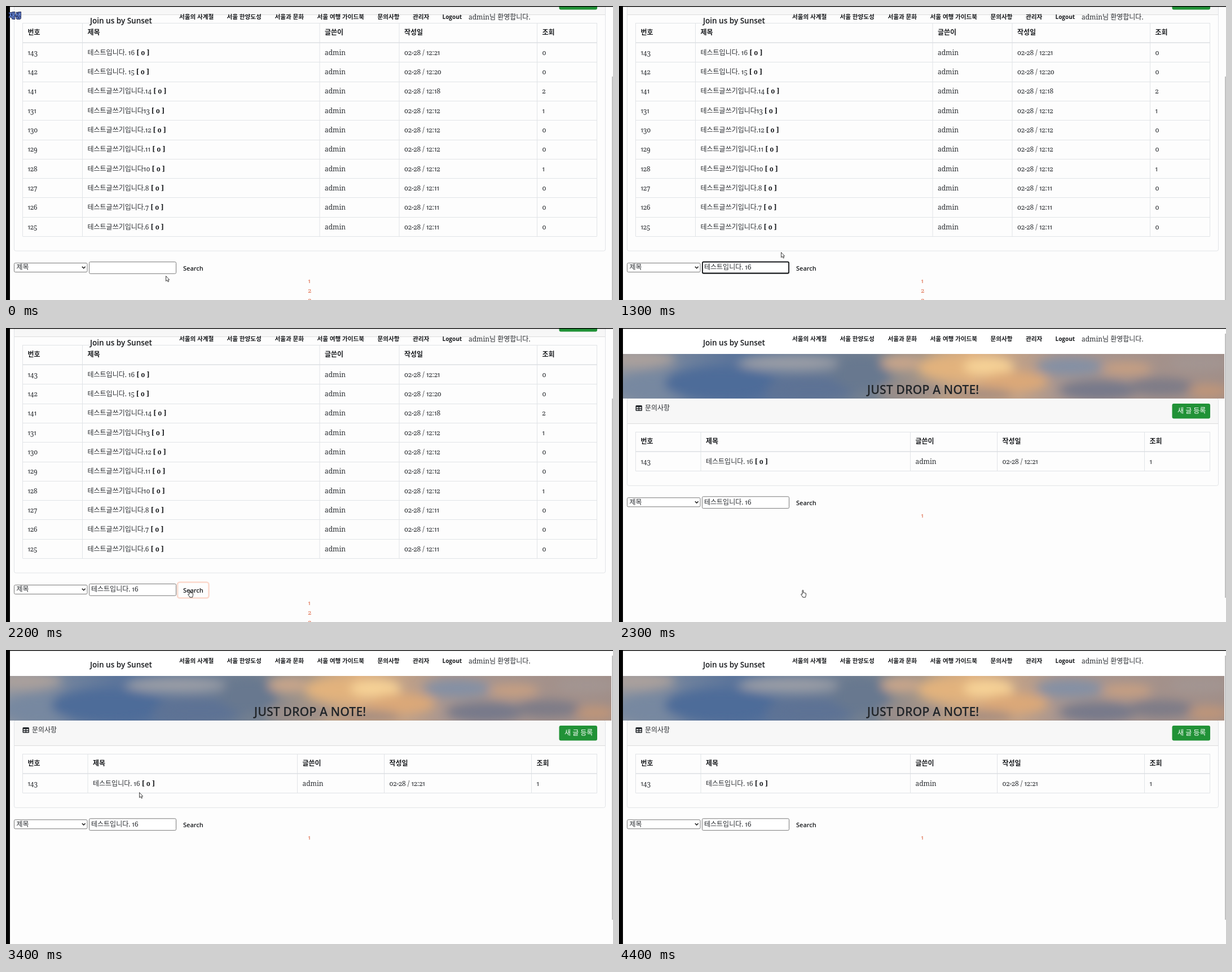
Animation of 1076x521 px, one loop 4600 ms. Source, as an HTML page:

```html
<!DOCTYPE html>
<html lang="ko">
<head>
<meta charset="utf-8">
<title>문의사항</title>
<style>
  html, body { margin: 0; width: 100%; height: 100%; overflow: hidden; background: #fdfdfd; }
  svg { display: block; }
  text {
    font: 12px 'Noto Serif', 'Noto Sans CJK KR', serif;
    font-variant-numeric: oldstyle-nums proportional-nums;
    fill: #2a2d31; white-space: pre;
  }
  .b { font-weight: 700; fill: #1b1d20; }
  .sans { font-family: 'Open Sans', 'Noto Sans CJK KR', sans-serif; font-weight: 600; fill: #16181b; }
  .line { fill: none; stroke: #e1e4e7; }
  .box { fill: #fff; stroke: #7b7b7b; }
</style>
</head>
<body>
<svg id="stage" width="1076" height="521" viewBox="0 0 1076 521"></svg>
<script>
const LOOP = 4600;
const QUERY = '테스트입니다. 16';

const text = (x, y, s, cls = '', style = '') =>
  `<text x="${x}" y="${y}" class="${cls}" style="${style}">${s}</text>`;
const rect = (x, y, w, h, attrs) =>
  `<rect x="${x}" y="${y}" width="${w}" height="${h}" ${attrs}/>`;
const path = (d, attrs) => `<path d="${d}" ${attrs}/>`;
const group = (id, body, attrs = '') => `<g id="${id}" ${attrs}>${body}</g>`;

function table(top, cols, rows) {
  const head = 35, step = 34.3, bottom = top + head + rows.length * step;
  const cells = (y, values, cls) =>
    values.map((v, i) => text(cols[i] + 9, y, v, cls)).join('');
  let out = cells(top + 21, ['번호', '제목', '글쓴이', '작성일', '조회'], 'b');
  let lines = '';
  rows.forEach(([no, title, time, views], i) => {
    const y = top + head + i * step;
    out += cells(y + 21.8, [no, `${title} <tspan class="b">[ 0 ]</tspan>`, 'admin', `02-28 / ${time}`, views]);
    lines += `M29.5 ${Math.round(y + step) + .5}H1047.5`;
  });
  cols.forEach(x => lines += `M${x} ${top}V${bottom}`);
  return path(lines + `M29.5 ${top + .5}H1047.5`, 'class="line"') +
    path(`M29.5 ${top + head}H1047.5`, 'stroke="#dcdfe3" stroke-width="1.5"') + out;
}

// Card, list and search row; dy is the scroll offset.
function page(dy, cols, rows, pages) {
  const bottom = 219 + dy + rows.length * 34.3 + 26;
  const f = bottom + 29.5;
  return rect(15, 125 + dy, 1047, 44.5, 'fill="#f7f7f7"') +
    path(`M15 ${169.5 + dy}H1062`, 'stroke="#dcdcdc"') +
    rect(14.5, 124.5 + dy, 1048, bottom - 124.5 - dy, 'rx="3" class="line"') +
    rect(29.5, 137 + dy, 11.5, 10, 'rx="1.5" fill="#212529"') +
    path(`M31 ${141.2 + dy}h3.6M36 ${141.2 + dy}h3.6M31 ${144.6 + dy}h3.6M36 ${144.6 + dy}h3.6`,
      'stroke="#f7f7f7" stroke-width="1.9"') +
    text(46, 146 + dy, '문의사항') +
    rect(980.5, 134 + dy, 67.5, 26.5, 'rx="3" fill="#219237"') +
    text(990, 151.3 + dy, '새 글 등록', '', 'fill:#fff') +
    table(184 + dy, cols, rows) +
    rect(14.5, f - 8, 129.5, 16, 'rx="2" class="box"') +
    text(18.5, f + 3.8, '제목') +
    path(`M134.8 ${f - 1.6}l2.9 2.9l2.9 -2.9`, 'fill="none" stroke="#222" stroke-width="1.5"') +
    rect(147.5, f - 10, 154, 20.8, 'rx="2" class="box"') +
    text(314, f + 5, 'Search', 'sans', 'font-size:11px') +
    pages.map((n, i) => text(535.5, f + 27.5 + i * 17, n, '', 'fill:#dc5f3c;font-size:11px')).join('');
}

function header() {
  const items = [[307, '서울의 사계절'], [391.5, '서울 한양도성'], [476.5, '서울과 문화'],
    [551.5, '서울 여행 가이드북'], [658.5, '문의사항'], [721, '관리자']];
  return text(149, 31, 'Join us by Sunset', 'sans', 'font-size:13.5px') +
    items.map(([x, s]) => text(x, 23.3, s, 'sans', 'font-size:10.6px;font-weight:700')).join('') +
    text(773.5, 23.3, 'Logout', 'sans', 'font-size:10px;font-weight:700') +
    text(820, 24.2, 'admin님 환영합니다.');
}

function banner() {
  const puffs = [
    [30, 55, 70, 16, '#aaa09c'], [60, 105, 70, 26, '#7788a0'], [180, 98, 100, 30, '#4d6c99'],
    [300, 62, 90, 14, '#9a9da6'], [340, 108, 80, 22, '#5d7294'], [430, 80, 50, 32, '#68788f'],
    [500, 62, 36, 14, '#c8a58a'], [520, 112, 60, 14, '#9d8e88'], [590, 70, 60, 22, '#e2b27d'],
    [655, 68, 45, 16, '#f6d296'], [700, 95, 60, 18, '#dba878'], [640, 118, 60, 12, '#a58d80'],
    [800, 68, 60, 16, '#8490a4'], [850, 110, 70, 18, '#77798a'], [900, 72, 45, 12, '#c69f82'],
    [960, 104, 60, 16, '#7e7b87'], [1030, 62, 55, 14, '#a39592'], [1045, 112, 36, 12, '#c09578']
  ];
  return `<g clip-path="url(#sky)">` + rect(7, 46, 1066, 79, 'fill="url(#dusk)"') +
    '<g filter="url(#soft)">' + puffs.map(([x, y, rx, ry, c]) =>
      `<ellipse cx="${x}" cy="${y}" rx="${rx}" ry="${ry}" fill="${c}"/>`).join('') + '</g></g>' +
    text(539, 117.3, 'JUST DROP A NOTE!', 'sans', 'font-size:21.3px;text-anchor:middle;fill:#212529');
}

const defs = `<defs>
  <clipPath id="sky">${rect(7, 46, 1066, 79, '')}</clipPath>
  <filter id="soft" x="-10%" y="-50%" width="120%" height="200%"><feGaussianBlur stdDeviation="9"/></filter>
  <linearGradient id="dusk">
    <stop offset="0" stop-color="#8b939f"/><stop offset=".2" stop-color="#56719a"/>
    <stop offset=".42" stop-color="#76818f"/><stop offset=".58" stop-color="#dcae80"/>
    <stop offset=".72" stop-color="#a9968f"/><stop offset="1" stop-color="#a08e88"/>
  </linearGradient></defs>`;

const posts = [
  [143, '테스트입니다. 16', '12:21', 0], [142, '테스트입니다. 15', '12:20', 0],
  [141, '테스트글쓰기입니다.14', '12:18', 2], [131, '테스트글쓰기입니다13', '12:12', 1],
  [130, '테스트글쓰기입니다.12', '12:12', 0], [129, '테스트글쓰기입니다.11', '12:12', 0],
  [128, '테스트글쓰기입니다10', '12:12', 1], [127, '테스트글쓰기입니다.8', '12:11', 0],
  [126, '테스트글쓰기입니다.7', '12:11', 0], [125, '테스트글쓰기입니다.6', '12:11', 0]
];

const ink = 'fill="#fff" stroke="#2b2b2b" stroke-linejoin="round"';
const cursors = {
  arrow: path('M.5 .5V9.6L2.6 7.7L4.1 10.9L5.6 10.2L4.2 7.2H6.6Z', ink + ' stroke-width=".9"'),
  beam: path('M-2.2 -5.2H-.6L0 -4.6L.6 -5.2H2.2M0 -4.6V4.6M-2.2 5.2H-.6L0 4.6L.6 5.2H2.2',
    'fill="none" stroke="#333" stroke-width="1"'),
  hand: path('M3 8V1.6Q3 .5 3.9 .5T4.8 1.6V5.2Q5.6 4.6 6.3 5.4Q7.2 4.9 7.9 5.8Q9.4 5.5 9.4 7V9.6Q9.2 11 8.4 13.2H3.9Q3 11.2 .9 8.8Q.3 7.8 1.2 7.4Q2 7.2 3 8Z',
    ink)
};

const stage = document.getElementById('stage');
stage.innerHTML = defs + rect(0, 0, 1076, 521, 'fill="#fdfdfd"') +
  group('list',
    page(-154, [29.5, 135.5, 556, 697, 941.5, 1047.5], posts, [1, 2, 3]) +
    group('focus', rect(148, 453.5, 153, 20, 'rx="2" fill="none" stroke="#15171a" stroke-width="1.8"')) +
    group('typed', text(151, 467.3, QUERY)) +
    group('ring', rect(304, 450.5, 55.5, 28, 'rx="4" fill="none" stroke="#fbd9cd" stroke-width="2.6"')) +
    rect(1074, 125, 2, 396, 'fill="#c1c1c1"')) +
  group('result',
    page(0, [29.5, 145, 516.5, 670.5, 931.5, 1047.5], [[143, QUERY, '12:21', 1]], [1]) +
    rect(7, 1, 1067, 45, 'fill="#fff"') + banner() +
    text(151, 313, QUERY) + rect(1074, 10, 2, 468, 'fill="#c1c1c1"')) +
  header() + rect(0, 0, 7, 521, 'fill="#000"') + rect(0, 0, 1076, 1.4, 'fill="#000"') +
  group('play', text(5, 22.3, '재생', 'sans',
    'font-size:12px;font-weight:700;fill:#6d8fe0;stroke:#1c2450;stroke-width:2px;paint-order:stroke')) +
  group('caret', rect(0, 457, 1, 12.5, 'fill="#111"')) +
  Object.keys(cursors).map(k => group(k, cursors[k])).join('');

// [time, cursor, x, y]
const moves = [
  [0, 'arrow', 283, 478], [100, 'arrow', 276, 478], [200, 'arrow', 261, 477],
  [300, 'beam', 248, 465], [400, 'beam', 244, 462.5], [1100, 'beam', 247, 461],
  [1200, 'beam', 258, 457], [1300, 'arrow', 287, 436], [1400, 'arrow', 296, 436],
  [1500, 'arrow', 306, 450], [1600, 'hand', 318, 463], [1700, 'hand', 322, 464],
  [2700, 'arrow', 324, 440], [2800, 'arrow', 316, 376], [2900, 'arrow', 288, 316],
  [3000, 'arrow', 252, 266], [3100, 'arrow', 245, 260], [3200, 'arrow', 239, 255],
  [3300, 'arrow', 236, 252], [3600, null, 0, 0]
];
// [time, x]; no x hides the caret
const blinks = [[0], [400, 151], [800], [900, 235.5], [1200], [1700, 235.5], [2100]];

const el = id => document.getElementById(id);
const at = (steps, t) => steps.filter(s => s[0] <= t).pop();
const show = (id, on, opacity = 1) => {
  el(id).style.display = on ? '' : 'none';
  el(id).style.opacity = opacity;
};

function draw(t) {
  show('list', t < 2300);
  show('result', t >= 2300);
  show('play', t < 1200);
  show('focus', t >= 400 && t < 2100);
  show('typed', t >= 900);
  show('ring', t >= 2100, t < 2200 ? .5 : 1);

  const caretX = at(blinks, t)[1];
  show('caret', caretX);
  if (caretX) el('caret').setAttribute('transform', `translate(${caretX} 0)`);

  const [, kind, x, y] = at(moves, t);
  for (const k in cursors) show(k, k === kind);
  if (kind) el(kind).setAttribute('transform', `translate(${x} ${y})`);
}

const start = performance.now();
function tick() {
  draw((performance.now() - start) % LOOP);
  requestAnimationFrame(tick);
}
tick();
</script>
</body>
</html>
```
